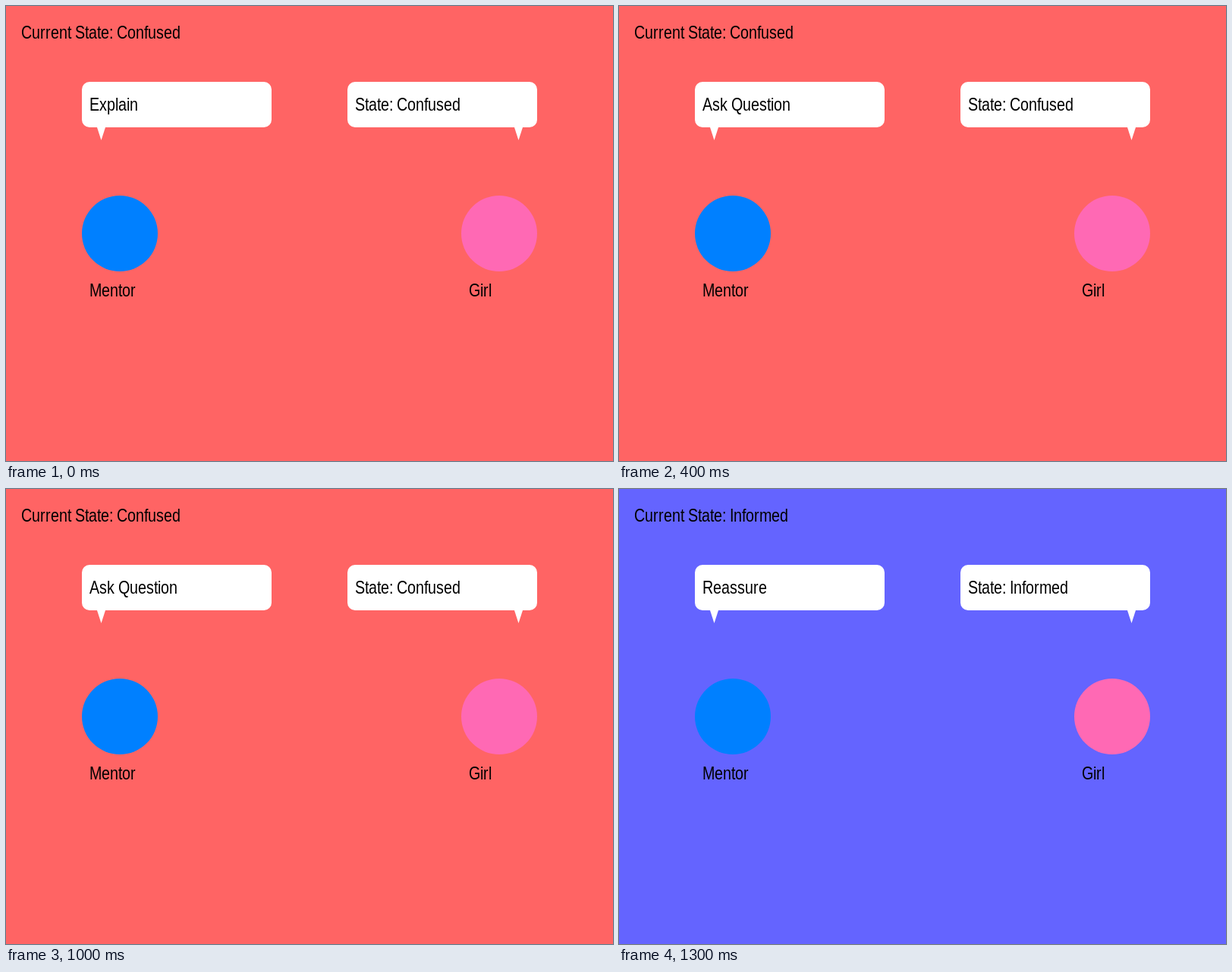
An HTML page with a canvas for the animation above (1400 ms loop, 800 by 600 pixels).

```html
<!DOCTYPE html>
<html lang="en">
<head>
<meta charset="utf-8">
<title>Mentor and girl</title>
<style>
  html, body { margin: 0; width: 100%; height: 100%; overflow: hidden; }
  canvas { display: block; }
</style>
</head>
<body>
<canvas id="stage" width="800" height="600"></canvas>
<script>
const ctx = document.getElementById('stage').getContext('2d');
const STEP = 100;
const CONDENSE = 0.82; // narrow cut of the sans face

const states = {
  C: { name: 'Confused', color: 'rgb(255,100,100)' },
  I: { name: 'Informed', color: 'rgb(100,100,255)' }
};
const actions = { E: 'Explain', R: 'Reassure', A: 'Ask Question', S: 'Share Story' };

// One state letter and one action letter per step
const steps = 'CE IA IR IE CA IE CS CA IR CE CA IS CE IR'.split(' ');

function text(str, x, y) {
  ctx.fillStyle = '#000';
  for (const ch of str) {
    ctx.save();
    ctx.translate(x, y);
    ctx.scale(CONDENSE, 1);
    ctx.fillText(ch, 0, 0);
    ctx.restore();
    // whole-pixel advances
    x += Math.round(ctx.measureText(ch).width * CONDENSE);
  }
}

function bubble(x, tailX, str) {
  ctx.fillStyle = '#fff';
  ctx.beginPath();
  ctx.roundRect(x, 100, 250, 60, 10);
  ctx.fill();
  ctx.beginPath();
  ctx.moveTo(tailX, 160);
  ctx.lineTo(tailX + 11, 160);
  ctx.lineTo(tailX + 5.5, 177);
  ctx.fill();
  text(str, x + 10, 138);
}

function person(x, color, label) {
  ctx.fillStyle = color;
  ctx.beginPath();
  ctx.arc(x, 300, 50, 0, Math.PI * 2);
  ctx.fill();
  text(label, x - 40, 383);
}

function draw(step) {
  const state = states[step[0]];
  ctx.font = '24px "Liberation Sans", Arial, sans-serif';
  ctx.fillStyle = state.color;
  ctx.fillRect(0, 0, 800, 600);
  person(150, 'rgb(0,128,255)', 'Mentor');
  person(650, 'rgb(255,105,180)', 'Girl');
  bubble(100, 120, actions[step[1]]);
  bubble(450, 670, 'State: ' + state.name);
  text('Current State: ' + state.name, 20, 43);
}

let start;
function tick(now) {
  start ??= now;
  draw(steps[Math.floor((now - start) / STEP) % steps.length]);
  requestAnimationFrame(tick);
}
draw(steps[0]);
requestAnimationFrame(tick);
</script>
</body>
</html>
```
